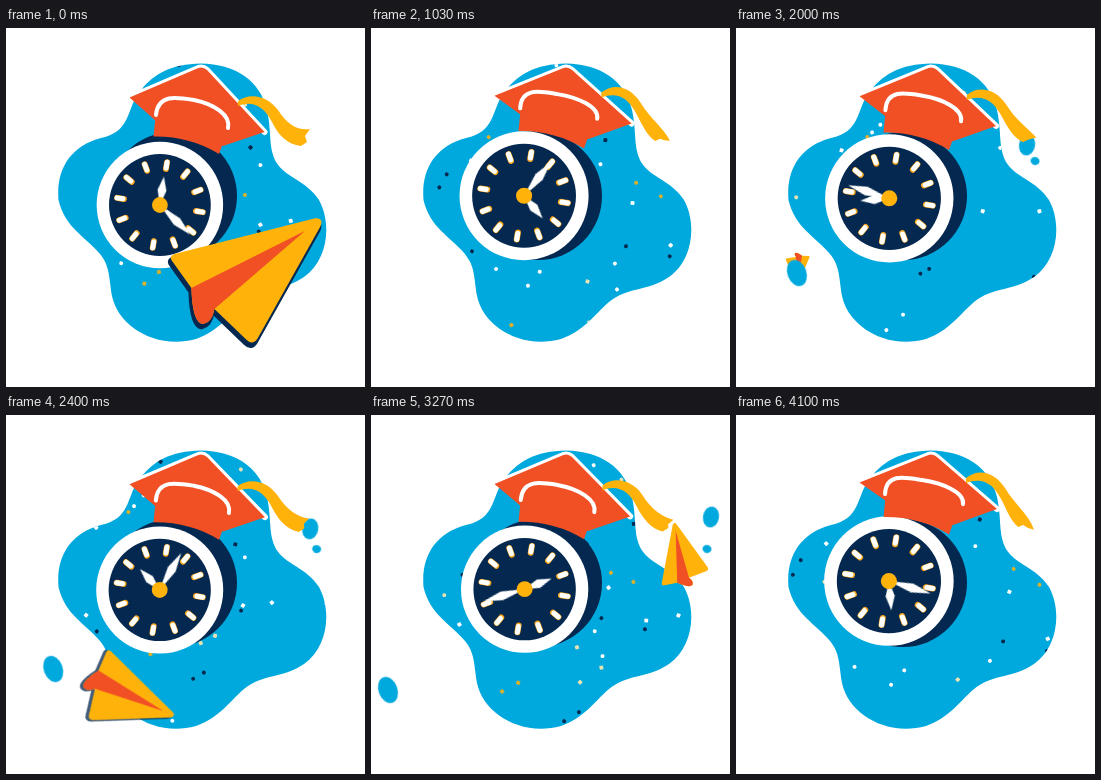
An HTML page for the animation above (4.13 s loop, 359 by 359 pixels).

```html
<!DOCTYPE html>
<html lang="en">
<head>
<meta charset="utf-8">
<title>Study time</title>
<style>
  html, body { margin: 0; width: 100%; height: 100%; overflow: hidden; background: #fff; }
  svg { display: block; width: 100%; height: 100%; }
  .blue { fill: #00a9dd; }
  .navy { fill: #04284f; }
  .red { fill: #f15025; }
  .gold { fill: #ffb20a; }
  .white { fill: #fff; }
  .line { fill: none; stroke: #fff; stroke-linecap: round; stroke-linejoin: round; }

  .long, .short, .drop { animation: 4130ms linear infinite; }
  .long { animation-name: long; }
  .short { animation-name: short; }
  .left { animation-name: left; }
  .right { animation-name: right; }
  .bead { animation-name: bead; }
  @keyframes long { from { transform: rotate(134deg); } to { transform: rotate(1194deg); } }
  @keyframes short { from { transform: rotate(8deg); } to { transform: rotate(539deg); } }
  @keyframes left {
    0%, 24% { transform: translate(105px, 222px); }
    35.6% { transform: translate(88px, 232px); }
    48.4% { transform: translate(61px, 245px); }
    66.8% { transform: translate(35px, 262px); }
    79.2% { transform: translate(17px, 275px); }
    91%, 100% { transform: translate(-14px, 290px); }
  }
  @keyframes right {
    0%, 24% { transform: translate(248px, 126px); }
    35.6% { transform: translate(269px, 122px); }
    48.4% { transform: translate(291px, 117px); }
    66.8% { transform: translate(316px, 111px); }
    79.2% { transform: translate(340px, 102px); }
    93%, 100% { transform: translate(372px, 94px); }
  }
  @keyframes bead {
    0%, 24% { transform: translate(264px, 137px); }
    35.6% { transform: translate(284px, 135px); }
    48.4% { transform: translate(299px, 133px); }
    66.8% { transform: translate(321px, 135px); }
    79.2% { transform: translate(336px, 134px); }
    95%, 100% { transform: translate(366px, 132px); }
  }
</style>
</head>
<body>
<svg viewBox="0 0 359 359">
  <defs>
    <path id="blob" d="M195 35.500C229 36 254 52 261 82C266 106 262 118 270 134C280 150 300 152 313 172C326 196 322 232 298 249C276 264 258 258 238 274C222 288 214 302 190 311C150 322 112 298 106 268C103 250 104 238 94 226C79 208 59 200 52.500 172C50 142 64 118 95 110C124 104 121 82 131 68C145 46 165 36 195 35.500Z"/>
    <clipPath id="inside"><use href="#blob"/></clipPath>
    <path id="body" d="M168 226L309 190.500Q318 190 314 199L251 311Q246 318 240 312L208 281Q206 294 197 296Q186 296 185 260L165 232Q163 228 168 226Z"/>
    <g id="plane">
      <use id="shade" href="#body" class="navy" x="-1.5" y="4" stroke="#04284f" stroke-width="3" stroke-linejoin="round"/>
      <use href="#body" class="gold"/>
      <path class="red" d="M299 203L185 260Q186 296 197 296Q206 294 208 281Z"/>
    </g>
  </defs>

  <use id="far" href="#plane"/>
  <g class="blue">
    <g class="drop left"><ellipse rx="9.5" ry="13.5" transform="rotate(-20)"/></g>
    <g class="drop right"><ellipse rx="8" ry="10.5" transform="rotate(10)"/></g>
    <g class="drop bead"><ellipse rx="4.5" ry="4" transform="rotate(15)"/></g>
  </g>
  <use href="#blob" class="blue"/>
  <g id="confetti" clip-path="url(#inside)"></g>

  <circle class="navy" cx="167" cy="168" r="64"/>
  <g id="face">
    <circle class="white" r="64"/>
    <circle class="navy" r="51.5"/>
    <g id="ticks" stroke-linecap="round"></g>
    <path class="white short" d="M0 0L4.500 -15L0 -29L-4.500 -15Z"/>
    <path class="white long" d="M0 0L4.500 -24L0 -43L-4.500 -24Z"/>
    <circle class="gold" r="8"/>
  </g>

  <path id="edge" class="line" stroke-width="6"/>
  <path id="board" class="red"/>
  <path id="crown" class="red" d="M150 84L147.500 108.500Q184 108 213 126L223 98Z"/>
  <path id="band" class="line" stroke-width="4"/>
  <path id="tassel" class="gold"/>
  <use id="near" href="#plane"/>
</svg>
<script>
  const LOOP = 4130, CYCLE = 2795;
  const $ = id => document.getElementById(id);
  const add = (parent, tag, attrs) => {
    const el = document.createElementNS('http://www.w3.org/2000/svg', tag);
    for (const k in attrs) el.setAttribute(k, attrs[k]);
    return parent.appendChild(el);
  };
  const set = (id, name, value) => $(id).setAttribute(name, value);

  for (let i = 0; i < 12; i++) {
    const tick = (stroke, width, from, to) => add($('ticks'), 'line', {
      y1: -from, y2: -to, stroke, 'stroke-width': width, transform: `rotate(${9.5 + 30 * i})`
    });
    tick('#fba61a', 6, 37, 44);
    tick('#fff', 5, 38, 44);
  }

  let seed = 11;
  const rand = () => (seed = seed * 16807 % 2147483647) / 2147483647;
  const colors = ['#fff', '#04284f', '#fff', '#e9e3b4', '#04284f', '#fff', '#d8b12f'];
  const dots = Array.from({ length: 46 }, (_, i) => ({
    angle: i * 2.39996, offset: rand(), reach: 105 + 35 * rand(), spin: 360 * rand(),
    el: add($('confetti'), 'rect', {
      x: -1.9, y: -1.9, width: 3.8, height: 3.8, rx: i % 3 ? 1.6 : 0.6, fill: colors[i % 7]
    })
  }));

  // Plane orbit: time, x, y, turn, scale
  const stops = [
    [0, 242, 249, 0, 1], [120, 281, 233, -10, .88], [250, 305, 205, -30, .68],
    [360, 313, 174, -48, .52], [475, 312, 145, -65, .41], [555, 302, 124, -83, .38],
    [630, 288, 107, -100, .36], [800, 248, 90, -125, .2], [1400, 130, 125, -170, .12],
    [1800, 72, 188, -212, .15], [2000, 61, 238, -233, .2], [2130, 69, 260, -250, .3],
    [2300, 95, 279, -282, .48], [2500, 140, 279, -320, .72], [2650, 187, 266, -346, .9],
    [2760, 228, 256, -357.5, 1]
  ];
  const stop = i => {
    const n = stops.length, turn = Math.floor(i / n), s = stops[i - turn * n];
    return [s[0] + turn * CYCLE, s[1], s[2], s[3] - turn * 360, s[4]];
  };
  function orbit(t) {
    let i = 0;
    while (stop(i + 1)[0] <= t) i++;
    const [p, a, b, q] = [i - 1, i, i + 1, i + 2].map(stop);
    const h = b[0] - a[0], u = (t - a[0]) / h;
    return [1, 2, 3, 4].map(k => {
      const m = (b[k] - p[k]) / (b[0] - p[0]) * h, n = (q[k] - a[k]) / (q[0] - a[0]) * h;
      return a[k] + u * (m + u * (3 * (b[k] - a[k]) - 2 * m - n + u * (2 * (a[k] - b[k]) + m + n)));
    });
  }

  // Blend two paths of the same structure
  const blend = (from, to, k) => {
    const ends = to.match(/[\d.]+/g);
    let i = 0;
    return from.replace(/[\d.]+/g, v => (+v + (ends[i++] - v) * k).toFixed(2));
  };
  const tasselLow = 'M232 73C244 64 262 68 272 82C281 96 291 103 304 101L299 108L301 114L295 118C281 116 273 108 266 94C258 78 246 72 232 78Z';
  const tasselHigh = 'M230 63C242 53 258 56 269 73C279 90 292 98 298 115L292 113L287 110L282 112C273 104 270 92 264 82C256 68 246 62 230 68Z';
  const bandLow = 'M150 87C152 66 170 69 188 72C208 76 225 87 222 100';
  const bandHigh = 'M149 79C150 58 168 62 186 65C206 68 229 77 227 89';

  function draw(t) {
    const phase = t % CYCLE, theta = 2 * Math.PI * t / CYCLE;
    const c = Math.cos(theta), rise = (1 - c) / 2;

    set('face', 'transform', `translate(${153.4 + .5 * c} ${171.5 + 5.5 * c}) scale(${1 - .012 * c})`);
    const side = 258.5 + 2.5 * rise, y = 104 - 10 * rise;
    const edge = `M123.500 ${69.5 - 2 * rise}L190 41Q196 37.500 201 42L${side} ${y}`;
    set('edge', 'd', edge);
    set('board', 'd', `${edge}L217 ${118 - 8 * rise}L150 ${93 - 7 * rise}Z`);
    set('crown', 'transform', `translate(0 ${-6.5 * rise})`);
    set('band', 'd', blend(bandLow, bandHigh, rise));
    set('tassel', 'd', blend(tasselLow, tasselHigh, rise));

    const [px, py, turn, size] = orbit(phase);
    const move = `translate(${px} ${py}) rotate(${turn}) scale(${size}) translate(-242 -249)`;
    const behind = phase > 560 && phase < 2120;
    set('far', 'transform', move);
    set('near', 'transform', move);
    set('far', 'display', behind ? 'inline' : 'none');
    set('near', 'display', behind ? 'none' : 'inline');
    set('shade', 'opacity', Math.min(1, Math.max(0, (size - .41) * 4)));

    for (const d of dots) {
      const u = (t / CYCLE + d.offset) % 1, r = 45 + d.reach * u;
      const x = 172 + r * Math.cos(d.angle), dy = 172 + r * Math.sin(d.angle) + 22 * u * u;
      d.el.setAttribute('transform', `translate(${x} ${dy}) rotate(${d.spin + 200 * u})`);
    }
  }

  const start = performance.now();
  function frame() {
    draw((performance.now() - start) % LOOP);
    requestAnimationFrame(frame);
  }
  frame();
</script>
</body>
</html>
```
